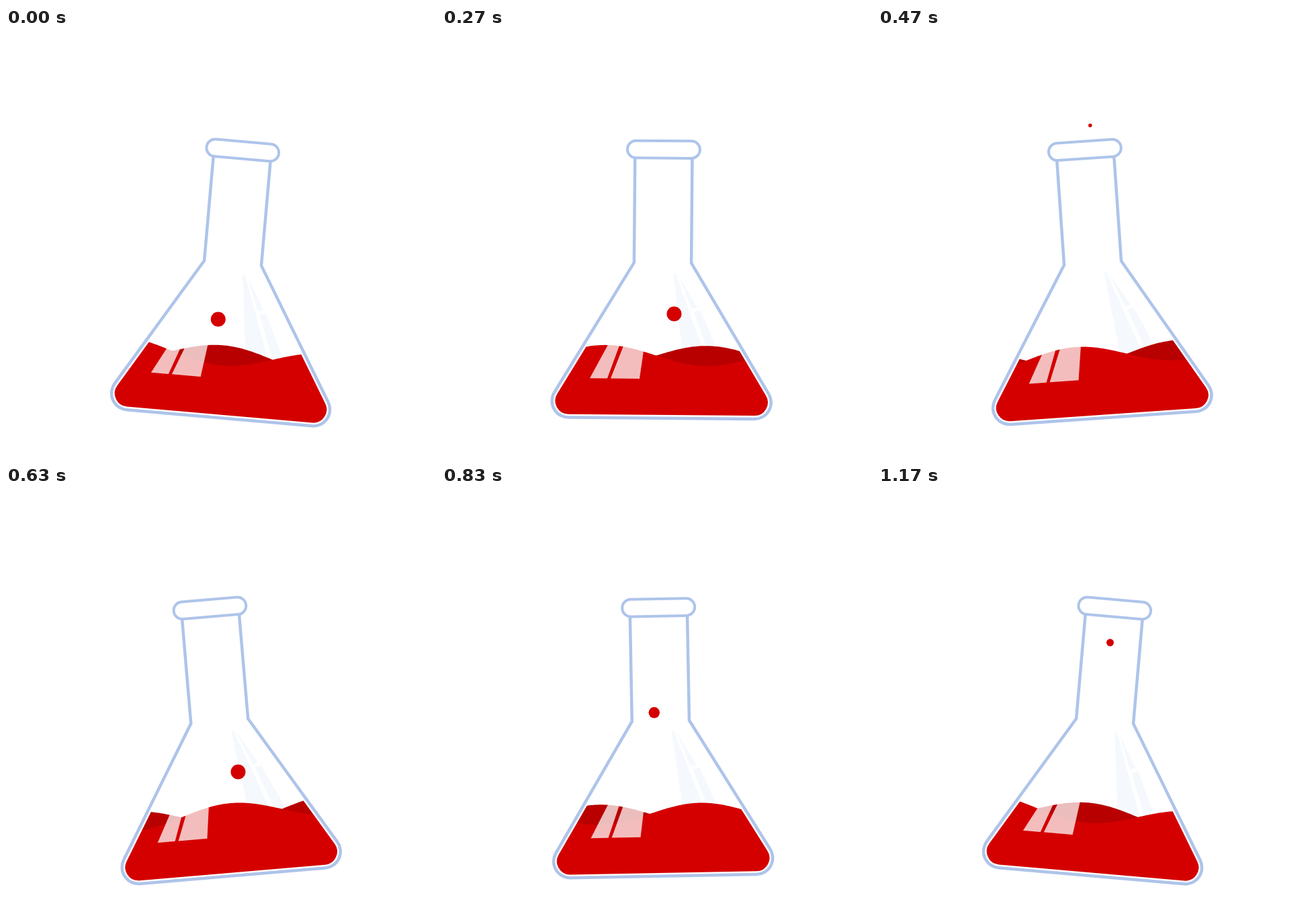
Animation, 640 px wide and 640 px high, one loop 1210 ms. Source, as an HTML page with a canvas:

```html
<!DOCTYPE html>
<html lang="en">
<head>
<meta charset="utf-8">
<title>Swinging flask</title>
<style>
  html, body { margin: 0; height: 100%; overflow: hidden; background: #fff; }
  canvas { display: block; }
</style>
</head>
<body>
<canvas width="640" height="640"></canvas>
<script>
const ctx = document.querySelector('canvas').getContext('2d');
const LOOP = 1210, RED = '#d40000', DARK = '#b80000', GLASS = '#aec4ea';
const PIVOT = [327.5, 465];
const SWING = 5 * Math.PI / 180;

// Bubble columns: x, first y, and the steps at which a bubble leaves the liquid
const columns = [
  { x: 315.8, y: 433.5, starts: [0, 9, 20] },
  { x: 345.5, y: 425.5, starts: [7, 16, 27] }
];

const rays = [
  [16, -100, 19.5, -100, 65.5, 25, 31.5, 25],
  [23, -99, 52, -49.5, 43.5, -47],
  [46.5, -43, 56.5, -45, 88.5, 25, 72, 25]
];
const glints = [
  [-107, 57.2, -81, 57.2, -60.5, 0, -76.5, 0],
  [-76, 57.2, -33, 57.2, -25.2, 0, -54, 0]
];

const smooth = p => p * p * (3 - 2 * p);

// Drawings advance 25 times a second and are shown 30 times a second
function stepAt(ms) {
  const shown = Math.min(35, Math.floor((ms + 3.4) * 0.03));
  return Math.ceil(shown * 5 / 6 - 0.5);
}

function polygon(points, color) {
  ctx.fillStyle = color;
  ctx.beginPath();
  for (let i = 0; i < points.length; i += 2) ctx.lineTo(points[i], points[i + 1]);
  ctx.fill();
}

function wave(step, side, color) {
  const points = [-200, 130];
  for (let x = -200; x <= 200; x += 2) {
    points.push(x, 22.6 + side * 15 * Math.cos((x + 3.5 - 10 * step) * Math.PI / 150));
  }
  polygon([...points, 200, 130], color);
}

function flaskPath() {
  const path = new Path2D();
  path.moveTo(-42.6, -271.5);
  path.lineTo(-42.6, -115.5);
  path.arcTo(-182, 115.7, 0, 115.7, 24.6);
  path.arcTo(182, 115.7, 42.6, -115.5, 24.6);
  path.lineTo(42.6, -115.5);
  path.lineTo(42.6, -271.5);
  return path;
}

const flask = flaskPath();
const rim = new Path2D();
rim.roundRect(-54, -297, 108, 25.6, 12.8);

function stroke(path, color, width) {
  ctx.strokeStyle = color;
  ctx.lineWidth = width;
  ctx.stroke(path);
}

function drawFlask(step) {
  const swing = step < 15 ? smooth(step / 15) : 1 - smooth((step - 15) / 14);
  ctx.save();
  ctx.translate(...PIVOT);
  ctx.rotate(SWING * (1 - 2 * swing));

  for (const ray of rays) polygon(ray, '#f5f9fd');
  ctx.save();
  ctx.clip(flask);
  wave(step, -1, DARK);
  wave(step, 1, RED);
  ctx.restore();
  for (const glint of glints) polygon(glint, 'rgba(255,255,255,.74)');

  // The white band leaves a gap between liquid and glass
  stroke(flask, '#fff', 9.6);
  stroke(flask, GLASS, 4.5);
  stroke(rim, GLASS, 4);
  ctx.restore();
}

function drawBubbles(step) {
  ctx.fillStyle = RED;
  for (const { x, y, starts } of columns) {
    for (const start of starts) {
      const age = step - start;
      if (age < 0 || age > 3) continue;
      ctx.beginPath();
      ctx.arc(x, y - 96.2 * age, 11 - 2.75 * age, 0, 2 * Math.PI);
      ctx.fill();
    }
  }
}

const began = performance.now();
function draw() {
  const step = stepAt((performance.now() - began) % LOOP);
  ctx.clearRect(0, 0, 640, 640);
  drawFlask(step);
  drawBubbles(step);
  requestAnimationFrame(draw);
}
draw();
</script>
</body>
</html>
```
